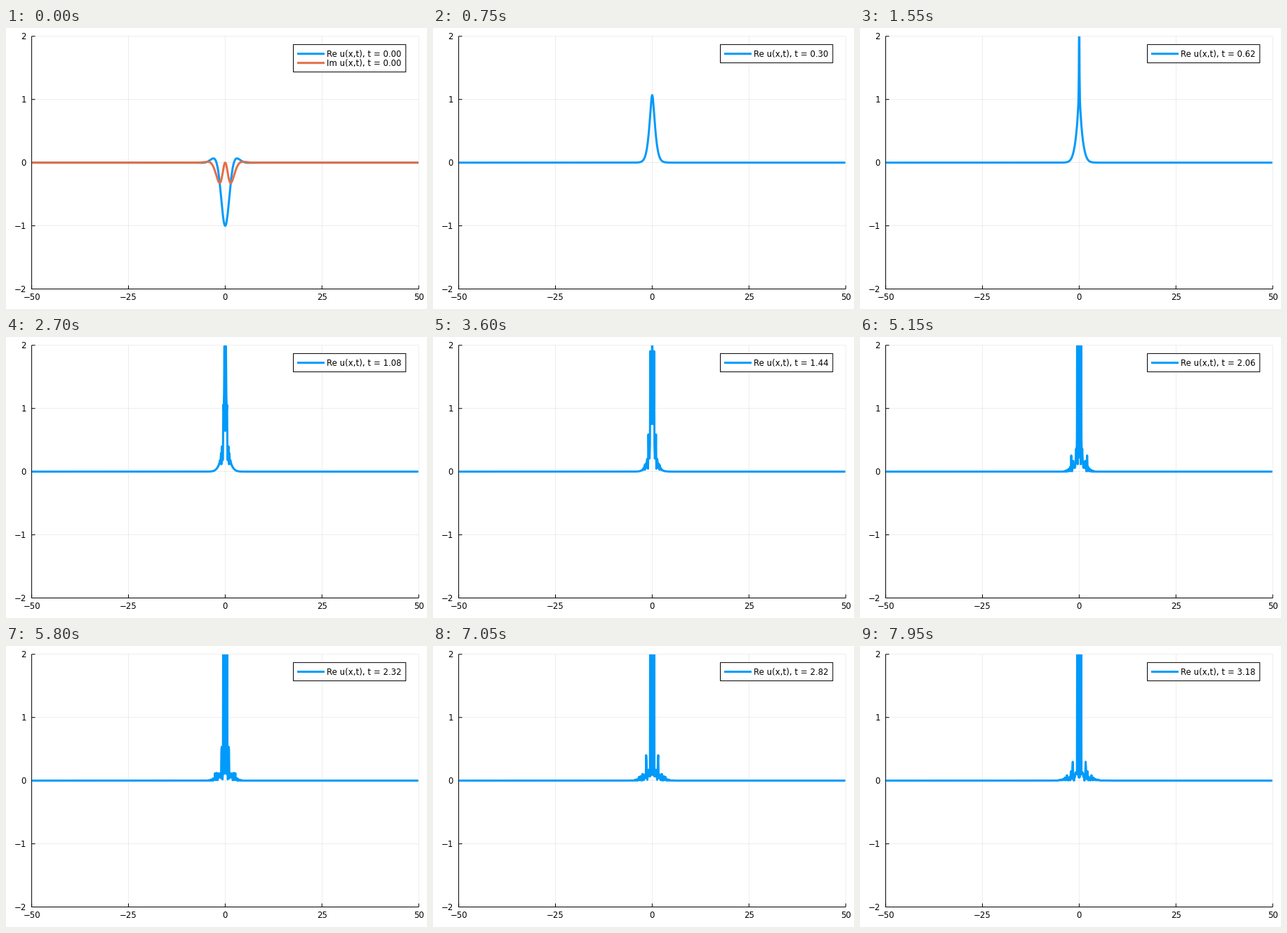
Animation of 600 by 400 pixels, one loop 8000 ms. Source, as a matplotlib script:

```python
import numpy as np
import matplotlib.pyplot as plt
from matplotlib.animation import FuncAnimation
from matplotlib.patches import Rectangle

FRAMES, INTERVAL = 160, 50
PX = 0.72                        # points per pixel at 100 dpi
BLUE, ORANGE = "#009afa", "#e36f47"
LEFT, RIGHT, TOP, BOTTOM = 36.6, 588.2, 11.8, 371.5
FONT = dict(family="DejaVu Sans", fontsize=11.8 * PX, color="black")

# Focusing semiclassical Schroedinger equation, split-step Fourier
EPS, DT, STEP = 0.1, 0.02, 100
N, SPAN = 1024, 100.0
x = (np.arange(N) - N // 2) * SPAN / N
k = 2 * np.pi * np.fft.fftfreq(N, SPAN / N)


def start(x):
    return -np.exp(1j * np.log(np.cosh(x))) / np.cosh(x)


def evolve():
    h = DT / STEP
    half = np.exp(-0.25j * EPS * k**2 * h)
    full = half**2
    u = start(x)
    density = [np.abs(u) ** 2]
    for _ in range(FRAMES - 1):
        u = np.fft.ifft(half * np.fft.fft(u))
        for j in range(STEP):
            u = u * np.exp(1j * h / EPS * (u.real**2 + u.imag**2))
            u = np.fft.ifft((half if j == STEP - 1 else full) * np.fft.fft(u))
        u[1:] = (u[1:] + u[:0:-1]) / 2      # keep it even in x
        density.append(np.abs(u) ** 2)
    return density


def px(v):
    return LEFT + (v + 50) * (RIGHT - LEFT) / 100


def py(v):
    return TOP + (2 - v) * (BOTTOM - TOP) / 4


density = evolve()

fig = plt.figure(figsize=(6, 4), dpi=100, facecolor="white")
ax = fig.add_axes([0, 0, 1, 1])
ax.set(xlim=(0, 600), ylim=(400, 0))
ax.axis("off")


def stroke(xv, yv, color="black", width=1.0, **kw):
    return ax.plot(xv, yv, color=color, lw=width * PX, snap=False,
                   solid_capstyle="butt", solid_joinstyle="round", **kw)[0]


def label(xp, yp, text, ha, **kw):
    return ax.text(xp, yp, text, ha=ha, va="baseline", **FONT, **kw)


def number(v):
    return str(v).replace("-", "\u2212")


for v in (-50, -25, 0, 25, 50):
    stroke([px(v)] * 2, [TOP, BOTTOM], alpha=0.1, width=0.7, zorder=1)
    stroke([px(v)] * 2, [BOTTOM, BOTTOM - 5], zorder=2)
    label(px(v), 386.9, number(v), "center")
for v in (-2, -1, 0, 1, 2):
    stroke([LEFT, RIGHT], [py(v)] * 2, alpha=0.1, width=0.7, zorder=1)
    stroke([LEFT, LEFT + 5], [py(v)] * 2, zorder=2)
    label(28.7, py(v) + 4.1, number(v), "right")
stroke([LEFT, LEFT, RIGHT], [TOP, BOTTOM, BOTTOM], zorder=2)

window = Rectangle((LEFT, TOP), RIGHT - LEFT, BOTTOM - TOP,
                   transform=ax.transData)
lines = [stroke(px(x), py(0 * x), c, 3, zorder=3) for c in (BLUE, ORANGE)]
for line in lines:
    line.set_clip_path(window)

box = Rectangle((409.5, 23.6), 160.3, 39, fc="white", ec="black",
                lw=PX, snap=False, zorder=4)
ax.add_patch(box)
keys = [stroke([415, 454], [y, y], c, 3, zorder=5)
        for y, c in ((36.7, BLUE), (49.7, ORANGE))]
names = [label(457.3, y, "", "left", zorder=5) for y in (40.9, 53.9)]


def draw(i):
    first = i == 0
    u = start(x)
    lines[0].set_ydata(py(u.real if first else density[i]))
    lines[1].set_ydata(py(u.imag))
    for item in (lines[1], keys[1], names[1]):
        item.set_visible(first)
    box.set_height(39 if first else 26)
    for name, part in zip(names, ("Re", "Im")):
        name.set_text(f"{part} u(x,t), t = {i * DT:.2f}")
    return [*lines, box, *keys, *names]


anim = FuncAnimation(fig, draw, frames=FRAMES, interval=INTERVAL,
                     init_func=lambda: draw(0), repeat=True, repeat_delay=0)
plt.show()
```
